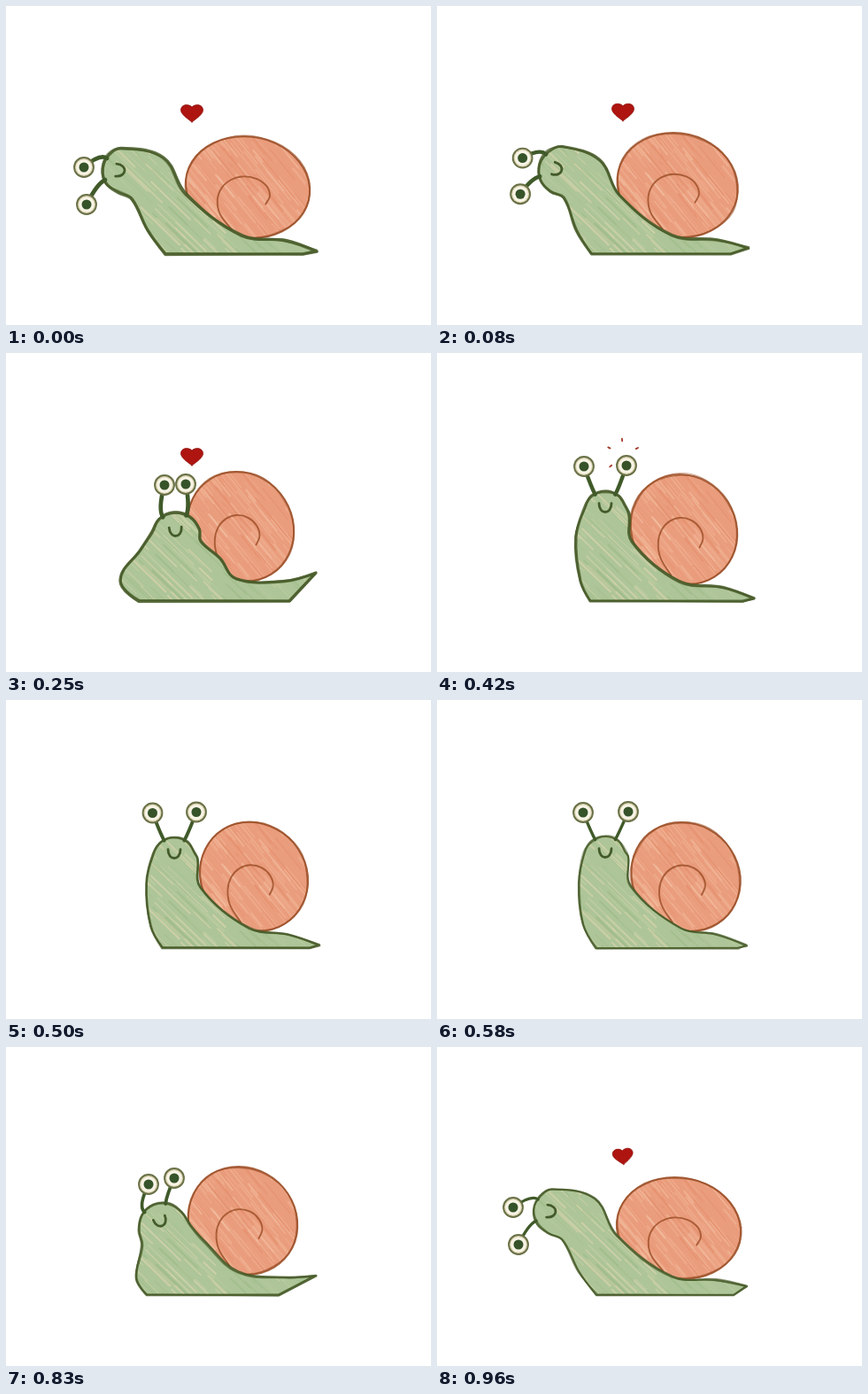
These frames come from a looping animation (480 by 360 pixels, 1000 ms). An HTML page with a canvas:

```html
<!DOCTYPE html>
<html lang="en">
<head>
<meta charset="utf-8">
<title>Snail in love</title>
<style>
html, body { margin: 0; width: 100%; height: 100%; overflow: hidden; background: #fff; }
canvas { display: block; width: 480px; height: 360px; }
</style>
</head>
<body>
<canvas id="stage" width="480" height="360"></canvas>
<script>
const ctx = document.getElementById('stage').getContext('2d');
const LOOP = 1000, FPS = 24, GROUND = 280;
const HELD = [1, 7]; // ticks that repeat the drawing before them
const RAD = Math.PI / 180;

// head: x, y, radius, lean; foot: x of heel and toe; shell: x, y, radii;
// the outline runs tail, foot, front, throat, head, nape, back, shell seat
const low = {
  tail: [351, 277], foot: [335, 180], front: [160, 253], throat: [142, 218],
  head: [135, 186, 26, -85], nape: [178, 171], back: [203, 212],
  eyes: [91, 224, 88, 182], shell: [273, 204.5, 70, 57.5], line: 4.2
};
const rise = {
  tail: [354, 260], foot: [320, 156], front: [148, 256], throat: [149, 212],
  head: [167, 186, 32, -38], nape: [205, 185], back: [214, 216],
  eyes: [105, 171, 127, 135], shell: [267, 194, 61, 65], line: 3
};
const squash = {
  tail: [350, 248], foot: [320, 150], front: [129, 257], throat: [152, 222],
  head: [192, 208, 28, -4], nape: [220, 212], back: [242, 232],
  eyes: [179, 149, 203, 148], shell: [265, 196, 60, 62], line: 4.2
};
const tall = {
  tail: [358, 277], foot: [345, 173], front: [162, 257], throat: [157, 208],
  head: [190, 180, 24, 0], nape: [217, 182], back: [220, 213],
  eyes: [166, 128, 214, 127], shell: [279, 199, 60, 62], line: 3.9
};
const stand = {
  tail: [350, 277], foot: [340, 180], front: [165, 253], throat: [160, 207],
  head: [190, 178, 24, 0], nape: [216, 177], back: [219, 210],
  eyes: [165, 127, 216, 126], shell: [281, 199.5, 61.5, 61.5], line: 2.8
};
const crouch = {
  tail: [350, 258], foot: [308, 159], front: [147, 261], throat: [154, 224],
  head: [177, 203, 27, -22], nape: [209, 202], back: [224, 219],
  eyes: [161, 155, 190, 148], shell: [267.5, 196, 61.5, 61], line: 3.3
};
const reach = { ...low, tail: [350, 270], eyes: [92, 223, 86, 181], line: 2.9 };

const linear = u => u;
const smooth = u => u * u * (3 - 2 * u);
const KEYS = [
  [0, low, u => u * u], [170, rise, linear], [250, squash, smooth], [420, tall, linear],
  [580, stand, smooth], [830, crouch, linear], [960, reach, linear], [LOOP, low, linear]
];

const lerp = (a, b, u) => a + (b - a) * u;
const mix = (a, b, u) => Array.isArray(a) ? a.map((v, i) => lerp(v, b[i], u)) : lerp(a, b, u);
const tickTime = n => Math.round(n * 100 / FPS) * 10;

function poseAt(t) {
  const i = KEYS.findIndex((k, n) => t < KEYS[n + 1][0]);
  const [t0, a, ease] = KEYS[i], [t1, b] = KEYS[i + 1];
  const u = ease((t - t0) / (t1 - t0)), pose = {};
  for (const name in a) pose[name] = mix(a[name], b[name], u);
  return pose;
}

function random(seed) {
  return () => {
    seed = seed + 0x6D2B79F5 | 0;
    let r = Math.imul(seed ^ seed >>> 15, 1 | seed);
    r = r + Math.imul(r ^ r >>> 7, 61 | r) ^ r;
    return ((r ^ r >>> 14) >>> 0) / 4294967296;
  };
}

// Point in shell units: the rim has radius 1
const onShell = ([x, y, rx, ry], angle, r) => {
  const dy = Math.sin(angle * RAD) * r * ry;
  return [x + Math.cos(angle * RAD) * r * rx + dy * .08, y + dy];
};

// Point around the head, turned from the way it leans
const onHead = ([x, y, radius, lean], turn, r) => {
  const a = (lean + turn) * RAD;
  return [x + Math.sin(a) * radius * r, y - Math.cos(a) * radius * r];
};

const rim = p => Array.from({ length: 12 }, (_, i) => onShell(p.shell, i * 30, 1));

const swirl = p => Array.from({ length: 10 }, (_, i) => {
  const u = i / 9, r = .41 - .1 * (1 - u) ** 6 + .29 * u ** 5;
  const [x, y] = onShell(p.shell, 25 - 270 * u, r);
  return [x, y + p.shell[3] * .2];
});

function outline(p) {
  const [tx, ty] = p.tail, [heel, toe] = p.foot;
  const skull = [-75, -38, 0, 38, 75].map(turn => onHead(p.head, turn, 1));
  return [p.tail, [heel, GROUND], [toe, GROUND], p.front, p.throat, ...skull,
    p.nape, p.back, onShell(p.shell, 100, .96), [tx - 35, 261 + (ty - 262) / 4]];
}

// Smooth curve; the first `sharp` points stay corners
function curve(points, closed, sharp = 0) {
  const n = points.length, path = new Path2D();
  const index = i => closed ? (i + n) % n : Math.max(0, Math.min(n - 1, i));
  const at = i => points[index(i)];
  const handle = (i, size) => {
    if (index(i) < sharp) return [0, 0];
    const [ax, ay] = at(i - 1), [bx, by] = at(i + 1);
    const d = Math.hypot(bx - ax, by - ay) || 1;
    return [(bx - ax) / d * size, (by - ay) / d * size];
  };
  path.moveTo(...points[0]);
  for (let i = 0; i < (closed ? n : n - 1); i++) {
    const [px, py] = at(i), [qx, qy] = at(i + 1);
    const size = Math.hypot(qx - px, qy - py) * .36;
    const [hx, hy] = handle(i, size), [gx, gy] = handle(i + 1, size);
    path.bezierCurveTo(px + hx, py + hy, qx - gx, qy - gy, qx, qy);
  }
  if (closed) path.closePath();
  return path;
}

function line(path, color, width, alpha = 1) {
  ctx.globalAlpha = alpha;
  ctx.strokeStyle = color;
  ctx.lineWidth = width;
  ctx.stroke(path);
  ctx.globalAlpha = 1;
}

// Pencil edge: one firm line and two loose, lighter ones
function sketch(points, color, width, rnd, closed, sharp) {
  line(curve(points, closed, sharp), color, width * .8, .85);
  for (const share of [.5, .35]) {
    const loose = points.map(q => q.map(v => v + (rnd() - .5) * 3));
    line(curve(loose, closed, sharp), color, width * share, .55);
  }
}

function hatch(path, [x, y], [w, h], angle, count, seed, colors) {
  const rnd = random(seed), dx = Math.cos(angle * RAD), dy = Math.sin(angle * RAD);
  ctx.save();
  ctx.clip(path);
  for (let i = 0; i < count; i++) {
    const cx = x + (rnd() - .5) * w, cy = y + (rnd() - .5) * h, len = 8 + rnd() * 26;
    const streak = new Path2D();
    streak.moveTo(cx - dx * len, cy - dy * len);
    streak.lineTo(cx + dx * len, cy + dy * len);
    line(streak, colors[i % colors.length], .7 + rnd() * 1.7, .25 + rnd() * .4);
  }
  ctx.restore();
}

function fill(path, color) {
  ctx.fillStyle = color;
  ctx.fill(path);
}

function drawShell(p, rnd) {
  const edge = rim(p), path = curve(edge, true);
  fill(path, '#ea9d7d');
  hatch(path, p.shell, [150, 130], 51, 180, 11, ['#f3c2a4', '#e38d6b', '#efb092']);
  sketch(edge, '#9c5029', 2.6, rnd, true);
  line(curve(swirl(p)), '#a3562f', 1.9, .9);
}

function drawBody(p, rnd) {
  const edge = outline(p), path = curve(edge, true, 3);
  fill(path, '#adc598');
  hatch(path, [(p.foot[1] + p.tail[0]) / 2 - 20, 220], [300, 150], 44, 220, 29,
    ['#e2d6b1', '#9cb985', '#c3cfa5']);
  sketch(edge, '#465a27', p.line, rnd, true, 3);
}

function drawEye(p, side) {
  const [x, y] = p.eyes.slice(side < 0 ? 0 : 2);
  const stalk = new Path2D();
  stalk.moveTo(...onHead(p.head, side * 29, .97));
  stalk.quadraticCurveTo(...onHead(p.head, side * 29, 1.35), x, y);
  line(stalk, '#405a29', p.line + .5);
  const disc = (r, color) => {
    const path = new Path2D();
    path.arc(x, y, r, 0, 7);
    fill(path, color);
  };
  disc(11.9, '#687046');
  disc(10, '#d6cfac');
  disc(8.8, '#f8f4e6');
  disc(5.5, '#36532a');
}

function drawMouth(p) {
  ctx.save();
  ctx.translate(...onHead(p.head, 0, .26));
  ctx.rotate(p.head[3] * RAD);
  const path = new Path2D();
  path.moveTo(-7, -4);
  path.bezierCurveTo(-7, 9, 7, 9, 7, -4);
  line(path, '#435b2a', 2.8);
  ctx.restore();
}

// The heart grows in just before the loop point, then drifts up
function drawHeart(t) {
  const s = t > 850 ? t - LOOP : t;
  if (s > 330) return;
  const size = s < 0 ? 1 - (s / 140) ** 2 : 1;
  ctx.save();
  ctx.translate(210, 121 - s * (s < 0 ? .06 : .016));
  ctx.rotate(s < 0 ? -.1 : 0);
  ctx.scale(size, size);
  const path = new Path2D('M0 10C-5 6-13 1-12.5-4C-12-10-4-11 0-7C4-11 12-10 12.5-4C13 1 5 6 0 10Z');
  fill(path, '#ae1410');
  line(path, '#8f1713', 1, .8);
  ctx.restore();
}

function drawBurst(t) {
  if (t < 380 || t > 420) return;
  const spread = t < 420 ? .65 : 1;
  for (const angle of [-150, -93, -28, 140]) {
    const dx = Math.cos(angle * RAD), dy = Math.sin(angle * RAD), r = 18 * spread;
    const path = new Path2D();
    path.moveTo(210 + dx * (r - 1.3), 116 + dy * (r - 1.3));
    path.lineTo(210 + dx * (r + 1.3), 116 + dy * (r + 1.3));
    line(path, '#a33a2a', 1.8);
  }
}

function draw(n) {
  const t = tickTime(n), p = poseAt(t), rnd = random(n + 5);
  ctx.fillStyle = '#fff';
  ctx.fillRect(0, 0, 480, 360);
  ctx.lineCap = ctx.lineJoin = 'round';
  drawShell(p, rnd);
  drawBody(p, rnd);
  drawEye(p, -1);
  drawEye(p, 1);
  drawMouth(p);
  drawHeart(t);
  drawBurst(t);
}

let shown = -1;
const start = performance.now();
function tick() {
  const t = (performance.now() - start) % LOOP;
  let n = FPS - 1;
  while (tickTime(n) > t || HELD.includes(n)) n--;
  if (n !== shown) draw(shown = n);
  requestAnimationFrame(tick);
}
tick();
</script>
</body>
</html>
```
